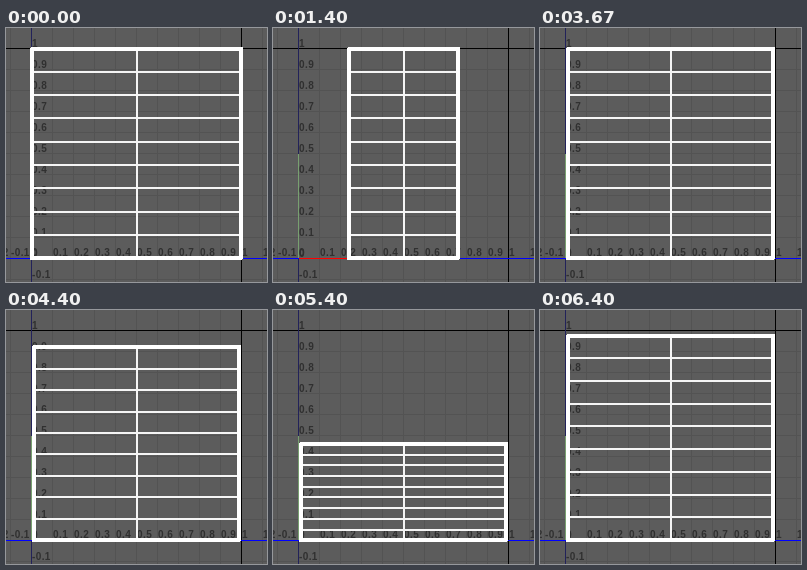
Write an HTML page that moves like this. It is 261 px wide and 254 px high and loops after 7590 ms.

```html
<!DOCTYPE html>
<html lang="en">
<head>
<meta charset="utf-8">
<title>UV grid scaling</title>
<style>
  html, body { margin: 0; width: 100%; height: 100%; overflow: hidden; background: #5c5c5c; }
  svg { display: block; }
  path { fill: none; stroke: #fff; shape-rendering: crispEdges; }
  text { font: bold 10px "Liberation Sans", Arial, sans-serif; letter-spacing: .4px; fill: #303030; }
</style>
</head>
<body>
<svg id="stage" width="261" height="254" viewBox="0 0 261 254">
  <path id="grid" style="stroke:#535353"/>
  <path d="M0 20.5H261M235.5 0V254" style="stroke:#000"/>
  <path d="M25.5 0V254" style="stroke:#22225a"/>
  <path d="M0 230.5H261" style="stroke:#00f"/>
  <path d="M26 230.5H130" style="stroke:#f00"/>
  <path d="M25.5 126V230" style="stroke:#78a070"/>
  <g id="labels"></g>
  <path id="inner" stroke-width="2" style="stroke:#f5f5f5"/>
  <path id="border" stroke-width="4" stroke-linejoin="round"/>
</svg>
<script>
const LOOP = 7590, FPS = 15;
const WIDTH = 261, BOTTOM = 230.2, ROWS = 9, CELL = 21;
const $ = id => document.getElementById(id);

// Each drag is [first step, last step, end value]; a step is 1/15 s
const widthDrags = [[10, 11, 107.5], [11, 22, 53.5], [24, 37, 135], [39, 47, 97.5], [48, 55, 102.5]];
const topDrags = [[63, 75, 134.8], [75, 77, 142], [79, 91, 22], [93, 96, 25.5]];

const ease = u => (1 - Math.cos(Math.PI * Math.min(1, Math.max(0, u)))) / 2;

const follow = (value, drags, step) => drags.reduce(
  (v, [from, to, end]) => v + (end - v) * ease((step - from) / (to - from)), value);

function buildGrid() {
  let lines = "", labels = "";
  const label = (n, x, y) => {
    labels += `<text x="${x}" y="${y}">${n / 10}</text>`;
  };
  for (let n = -2; n <= 11; n++) {
    const x = 25 + n * CELL, y = 230 - n * CELL;
    lines += `M${x + .5} 0V254M0 ${y + .5}H${WIDTH}`;
    label(n, x + 1, 228);
    if (n >= -1 && n <= 10) label(n, 26, y - 1);
  }
  $("grid").setAttribute("d", lines);
  $("labels").innerHTML = labels;
}

function draw(ms) {
  const step = Math.floor((ms % LOOP + 5) * FPS / 1000);
  const top = follow(20.6, topDrags, step);
  const left = Math.round(WIDTH / 2 - follow(104.5, widthDrags, step));
  const right = WIDTH - left;
  const rowY = i => Math.round(top + (BOTTOM - top) * i / ROWS);
  const y0 = rowY(0), y1 = rowY(ROWS);
  let inner = `M131 ${y0}V${y1}`;
  for (let i = 1; i < ROWS; i++) inner += `M${left} ${rowY(i)}H${right}`;
  $("inner").setAttribute("d", inner);
  $("border").setAttribute("d", `M${left} ${y0}H${right}V${y1}H${left}Z`);
}

buildGrid();
draw(0);
const start = performance.now();
(function tick() {
  draw(performance.now() - start);
  requestAnimationFrame(tick);
})();
</script>
</body>
</html>
```
